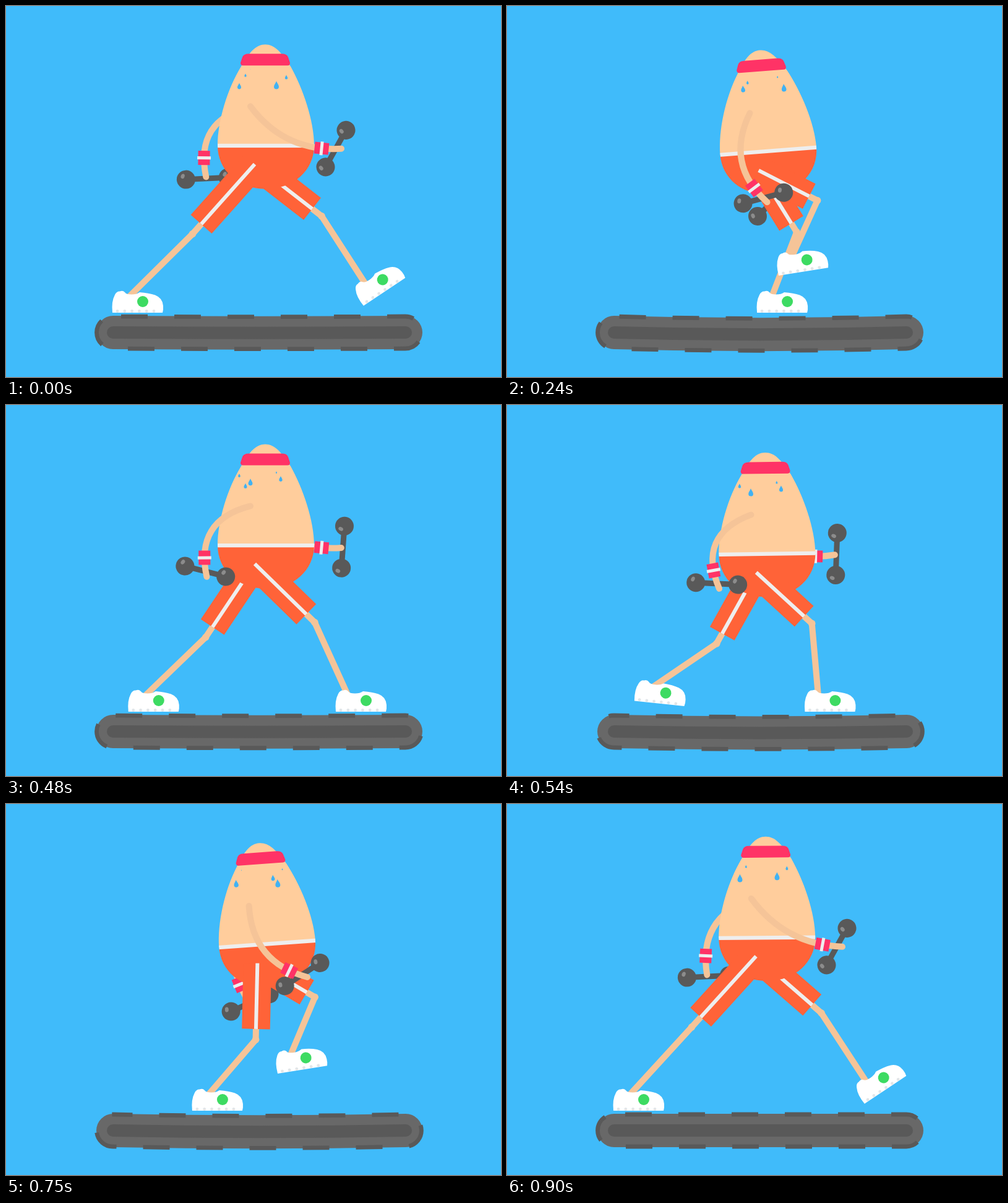
An HTML page with a canvas for the animation above (930 ms loop, 800 by 600 pixels).

```html
<!DOCTYPE html>
<html lang="en">
<head>
<meta charset="utf-8">
<title>Treadmill walk</title>
<style>
  html, body { margin: 0; width: 100%; height: 100%; overflow: hidden; background: #40bbfa; }
  canvas { display: block; }
</style>
</head>
<body>
<canvas id="stage" width="800" height="600"></canvas>
<script>
const ctx = document.getElementById('stage').getContext('2d');
const TAU = Math.PI * 2, RAD = Math.PI / 180;
const STEP = 30, STEPS = 31, LOOP = STEP * STEPS;
const STRIDE = 900, BOUNCE = 475, LANDING = 450, BELT = .8596;
const C = {
  sky: '#40bbfa', skin: '#ffcd9c', limb: '#f5c498', cloth: '#ff6338', pink: '#ff3366',
  pale: '#eeeeee', iron: '#595959', shine: '#8c8c8c', deck: '#686868', shoe: '#ffffff',
  dot: '#e3e6e8', badge: '#3ddb62', drop: '#40b2f3'
};

const EGG = new Path2D('M-1-163.5C14-163.5 24-152 40-128C60-92 78-40 78 0C78 40 45 70 0 70' +
  'C-45 70-78 40-78 0C-78-40-62-92-40-128C-26-152-16-163.5-1-163.5Z');
const HEADBAND = new Path2D('M-28-148.5H26Q34-148.5 36-143L39-134Q39-129.5 35-129.5H-37' +
  'Q-41-129.5-41-134L-38-143Q-36-148.5-28-148.5Z');
const DROP = new Path2D('M0-7C1-4 4-1 4 2A4 4 0 0 1-4 2C-4-1-1-4 0-7Z');
const SHOE = new Path2D('M1 0Q-1-18 5-29Q8-35 13-34.5Q18-36.5 21-33Q23-29.5 32-29.5Q40-29.5 45-33' +
  'Q60-32 70-28.5Q82-24 83-11Q83.5-5 82 0Z');

const wave = (t, period) => Math.sin(t / period * TAU);
const mix = (a, b, k) => [a[0] + (b[0] - a[0]) * k, a[1] + (b[1] - a[1]) * k];

function disc(x, y, r, color) {
  ctx.fillStyle = color;
  ctx.beginPath();
  ctx.arc(x, y, r, 0, TAU);
  ctx.fill();
}

function line(points, width, color, cap) {
  ctx.lineWidth = width;
  ctx.strokeStyle = color;
  ctx.lineCap = cap || 'butt';
  ctx.lineJoin = 'round';
  ctx.beginPath();
  points.forEach(p => ctx.lineTo(p[0], p[1]));
  ctx.stroke();
}

function box(x, y, w, h, color) {
  ctx.fillStyle = color;
  ctx.fillRect(x, y, w, h);
}

function at(x, y, angle, draw) {
  ctx.save();
  ctx.translate(x, y);
  ctx.rotate(angle);
  draw();
  ctx.restore();
}

function capsule(x0, y0, x1, y1, sag) {
  const r = (y1 - y0) / 2, mid = (x0 + x1) / 2;
  ctx.beginPath();
  ctx.moveTo(x0 + r, y0);
  ctx.quadraticCurveTo(mid, y0 + 2 * sag, x1 - r, y0);
  ctx.arc(x1 - r, y0 + r, r, -Math.PI / 2, Math.PI / 2);
  ctx.quadraticCurveTo(mid, y1 + 2 * sag, x0 + r, y1);
  ctx.arc(x0 + r, y0 + r, r, Math.PI / 2, Math.PI * 1.5);
}

function treadmill(t) {
  const sag = Math.max(0, 2 + 2.2 * wave(t - 50, BOUNCE));
  capsule(146, 501, 673, 555, sag);
  ctx.fillStyle = C.deck;
  ctx.fill();
  capsule(163, 518, 656, 538, sag);
  ctx.fillStyle = C.iron;
  ctx.fill();
  capsule(146.5, 502, 671.4, 554, sag);
  ctx.setLineDash([43, 43]);
  ctx.lineDashOffset = -13.5 + t * .3767;
  ctx.lineCap = 'butt';
  ctx.lineWidth = 6.8;
  ctx.strokeStyle = C.iron;
  ctx.stroke();
  ctx.setLineDash([]);
}

// Ankle position and shoe angle: key poses in the air, then carried back by the belt.
const SWING = [[0, 194, 475, 0], [120, 336, 419, 19.7], [240, 457.5, 411.7, -9],
  [360, 588, 437, -39], [390, 584.5, 455, -33.7], [LANDING, 580.8, 475, 0]];

function foot(t) {
  const u = t % STRIDE;
  if (u >= LANDING) return [580.8 - (u - LANDING) * BELT, 475, 0];
  const i = SWING.findIndex(k => k[0] > u);
  const a = SWING[i - 1], b = SWING[i], p = SWING[i - 2] || a, n = SWING[i + 1] || b;
  const h = b[0] - a[0], k = (u - a[0]) / h;
  return [1, 2, 3].map(j => {
    const ma = (b[j] - p[j]) / (b[0] - p[0]) * h, mb = (n[j] - a[j]) / (n[0] - a[0]) * h;
    const d = b[j] - a[j];
    return a[j] + k * (ma + k * (3 * d - 2 * ma - mb + k * (ma + mb - 2 * d)));
  });
}

function leg(hip, t) {
  const [x, y, angle] = foot(t);
  const dx = x - hip[0], dy = y - hip[1], reach = Math.hypot(dx, dy);
  // The leg stretches: thigh and shin are equal halves of its length.
  const length = reach + Math.max(0, 310 - reach) ** 2 / 410;
  const bend = Math.sqrt(length * length - reach * reach) / 2 / reach;
  const knee = [hip[0] + dx / 2 + dy * bend, hip[1] + dy / 2 - dx * bend];
  const hem = mix(hip, knee, .86);

  line([mix(hip, knee, .75), knee, [x, y]], 10, C.limb);
  disc(knee[0], knee[1], 5.8, C.limb);
  line([hip, hem], 45.5, C.cloth);
  line([hip, hem], 6, C.pale);

  at(x, y, angle * RAD, () => {
    ctx.translate(-23, 21);
    ctx.fillStyle = C.shoe;
    ctx.fill(SHOE);
    for (let i = 0; i < 6; i++) disc(9 + i * 11.8, -2.6, 2.4, C.dot);
    disc(50, -18, 9, C.badge);
  });
}

function dumbbell(x, y, angle) {
  at(x, y, angle, () => {
    line([[-34, 0], [34, 0]], 9, C.iron);
    for (const end of [-34, 34]) {
      disc(end, 0, 15, C.iron);
      ctx.fillStyle = C.shine;
      ctx.beginPath();
      ctx.ellipse(end - 5, -5.5, 3, 4, .4, 0, TAU);
      ctx.fill();
    }
  });
}

// The hand swings on a shallow arc; the grip turns with it.
function arm(shoulder, t, grip, offset) {
  const phase = t / STRIDE * TAU, s = Math.cos(phase);
  const hand = [432 + 110 * s, 313.5 - s * (41.5 + s * (60.7 - 19.5 * s))];
  const turn = (grip - 40 * s - 9 * Math.sin(2 * phase)) * RAD, lean = turn - 28 * RAD;
  dumbbell(hand[0] + offset * Math.sin(lean), hand[1] - offset * Math.cos(lean), turn);

  const dx = hand[0] - shoulder[0], dy = hand[1] - shoulder[1], reach = Math.hypot(dx, dy);
  const bow = 2 * (33 - (reach - 133) * .38) / reach;
  const elbow = [shoulder[0] + dx / 2 - dy * bow, shoulder[1] + dy / 2 + dx * bow];
  ctx.lineWidth = 10;
  ctx.lineCap = 'round';
  ctx.strokeStyle = C.limb;
  ctx.beginPath();
  ctx.moveTo(...shoulder);
  ctx.quadraticCurveTo(...elbow, ...hand);
  ctx.stroke();

  const p = mix(shoulder, elbow, .82), q = mix(elbow, hand, .82), wrist = mix(p, q, .82);
  at(wrist[0], wrist[1], Math.atan2(q[1] - p[1], q[0] - p[0]), () => {
    box(-11.5, -9.5, 23, 19, C.pink);
    box(-2.5, -11, 5, 22, C.pale);
  });
}

// Each drop is [birth time, x]; all grow and fall alike.
const DROPS = [[210, -43], [680, -33], [900, -25], [320, 17], [610, 33], [90, 24]];

function sweat(t) {
  for (const [birth, x] of DROPS) {
    const p = ((t - birth + LOOP) % LOOP) / 780;
    if (p >= 1) continue;
    const size = Math.min(p / .75, 1, (1 - p) / .1);
    ctx.save();
    ctx.translate(x, -125 + 29 * Math.min(1, p / .82));
    ctx.scale(size, size);
    ctx.fillStyle = C.drop;
    ctx.fill(DROP);
    ctx.restore();
  }
}

function torso(t) {
  ctx.save();
  ctx.clip(EGG);
  box(-90, -170, 180, 170, C.skin);
  box(-90, 2, 180, 80, C.cloth);
  box(-90, -3, 180, 6.3, C.pale);
  ctx.restore();
  sweat(t);
  ctx.fillStyle = C.pink;
  ctx.fill(HEADBAND);
}

function draw(t) {
  box(0, 0, 800, 600, C.sky);
  treadmill(t);

  const waist = 230.5 + 18 * wave(t - 20, BOUNCE), pivot = waist - 30;
  const tilt = -2.2 * (1 - Math.cos(t / BOUNCE * TAU)) * RAD;
  const cos = Math.cos(tilt), sin = Math.sin(tilt);
  const place = (x, y) => [420 + x * cos - (y + 30) * sin, pivot + x * sin + (y + 30) * cos];
  const hip = place(-18, 30), shoulder = place(-25, -63.5);

  arm(shoulder, t - 472, -45, -3);
  leg(hip, t + 390);
  at(420, pivot, tilt, () => {
    ctx.translate(0, 30);
    torso(t);
  });
  leg(hip, t);
  arm(shoulder, t, -21, 9);
}

const start = performance.now();
function tick() {
  const step = Math.floor((performance.now() - start) / STEP) % STEPS;
  draw(step * STEP);
  requestAnimationFrame(tick);
}
tick();
</script>
</body>
</html>
```
